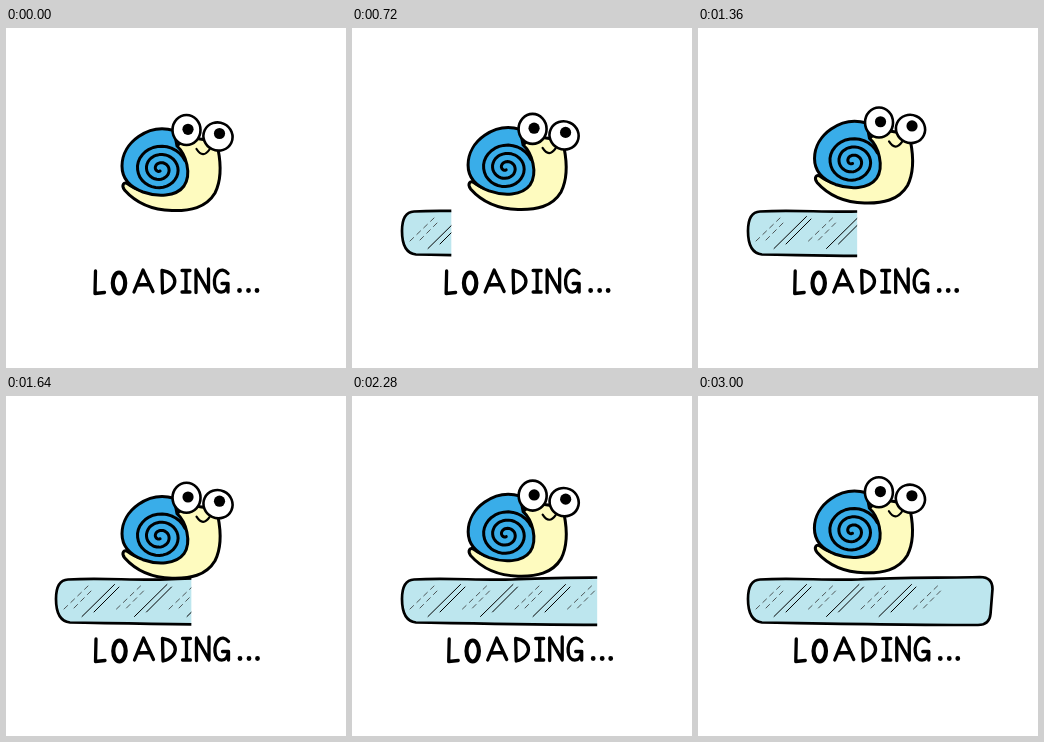
Write an HTML page that moves like this. It is 340x340 px and loops after 3.04 s.

```html
<!DOCTYPE html>
<html lang="en">
<head>
<meta charset="utf-8">
<title>Loading snail</title>
<style>
  html, body { margin: 0; width: 100%; height: 100%; overflow: hidden; background: #fff; }
  svg { display: block; width: 100vw; height: 100vh; }
  .ink { fill: none; stroke: #000; stroke-width: 3; stroke-linecap: round; stroke-linejoin: round; }
  .body { fill: #fefbbf; }
  .shell { fill: #39ade9; }
  .eye { fill: #fff; stroke-width: 2.6; }
  .smile { stroke-width: 2.2; }
  .bar { fill: #bde6ee; stroke-width: 2.7; }
  .shine { stroke-width: 1; }
  .dashed { stroke: #333; stroke-dasharray: 5 4.5; stroke-width: .8; }
  .label { stroke-width: 3.3; }
  .bold { stroke-width: 4.2; }
  .dots { stroke-width: 4.8; }
</style>
</head>
<body>
<svg viewBox="0 0 340 340">
  <defs>
    <clipPath id="wipe"><rect id="wipeBox" x="0" y="170" width="32" height="70"/></clipPath>
  </defs>

  <g clip-path="url(#wipe)">
    <path class="ink bar" d="M62 183.5 C95 181.5 125 184.5 160 183.5 C200 181 245 182 282 181 Q294.5 181 294.5 193 L292.5 218 Q291.5 229 280 229 C210 229 130 227.5 64 226.5 Q50 225 50 203 Q50 184 62 183.5Z"/>
    <g id="shines"></g>
  </g>

  <g id="snail">
    <path class="ink body" d="M172 117 C180 108 205 108 212 121 C215 136 215 153 209 165 C200 180 184 183 166 182.5 C145 182 130 175 118.5 162 C115 157 118 153 122 156 Q127 160 137 163 Z"/>
    <path class="ink shell" d="M168 102.500 C143 95 116 114 116 138 C116 151 124 159 137 164 C151 169 170 169 178 158 C186 146 180 126 171 118 Z"/>
    <path id="spiral" class="ink"/>
    <ellipse class="ink eye" cx="180.5" cy="102" rx="14" ry="15"/>
    <ellipse class="ink eye" cx="212" cy="108.5" rx="14.7" ry="14" transform="rotate(25 212 108.5)"/>
    <circle cx="182" cy="101.3" r="5.6"/>
    <circle cx="213.5" cy="105.5" r="5.6"/>
    <path class="ink smile" d="M190.5 121 Q197 131 203.5 121.5"/>
  </g>

  <g id="label" class="ink label" role="img" aria-label="LOADING...">
    <path d="M89.5 243 L89 265.5 L98.5 264.5"/>
    <ellipse class="bold" cx="113" cy="255" rx="6.2" ry="10.5"/>
    <path d="M128 264 L137 242 L147 263.5 M131.5 257 L143 256.5"/>
    <path d="M156 242.5 L156.5 265 C173 261 173 245 156 242.5"/>
    <path d="M176 242.5 H184 M180 242.5 V264 M176 264 H184"/>
    <path d="M190 264.5 V242 L202.5 264 V241"/>
    <path d="M222 245.5 C215 237 207.500 246 208.5 256 C209.5 267 221 267 222 255.5 H216 M222 255.5 V264"/>
    <path class="dots" d="M233.5 262.5h.01 M242.5 262.5h.01 M251 262.5h.01"/>
  </g>
</svg>
<script>
  const LOOP = 3040, STEP = 40, BEAT = 800;
  const $ = id => document.getElementById(id);

  // shell spiral, winding inwards from the shell's right edge
  let d = "";
  for (let k = 0; k <= 2.7; k += 0.03) {
    const a = -0.35 - 2 * Math.PI * k, r = 26.5 - 9 * k;
    d += (d ? "L" : "M") + (154 + r * Math.cos(a)).toFixed(1) + " " + (141 + 0.92 * r * Math.sin(a)).toFixed(1);
  }
  $("spiral").setAttribute("d", d);

  // repeating glints on the glass bar
  let glints = "";
  for (let i = 0; i < 4; i++) {
    const x = 52.5 * i;
    glints += `<path class="ink shine dashed" d="M${58 + x} 213l24 -23M${68 + x} 212l20 -20"/>`;
    if (i < 3) glints += `<path class="ink shine" d="M${76 + x} 220.5l32.5 -32M${88 + x} 216l25 -25"/>`;
  }
  $("shines").innerHTML = glints;

  // label drift within one beat: [phase, x]
  const drift = [[0, 0], [.25, 2.5], [.55, 5.4], [.7, 7.7], [.77, 9.2], [.85, 7.7], [1, 0]];
  function driftAt(u) {
    const i = drift.findIndex(p => p[0] > u);
    const [u0, x0] = drift[i - 1], [u1, x1] = drift[i];
    return x0 + (x1 - x0) * (u - u0) / (u1 - u0);
  }

  const start = performance.now();
  function draw() {
    const now = Math.max(0, performance.now() - start) % LOOP;
    const t = Math.floor(now / STEP) * STEP;
    const u = t % BEAT / BEAT;
    const lift = (1 - Math.cos(2 * Math.PI * u)) / 2;
    $("snail").setAttribute("transform", `translate(${lift * 0.8} ${-lift * 11.5})`);
    $("label").setAttribute("transform", `translate(${driftAt(u)} 0)`);
    $("wipeBox").setAttribute("width", 32 + 0.0935 * t);
    requestAnimationFrame(draw);
  }
  draw();
</script>
</body>
</html>
```
